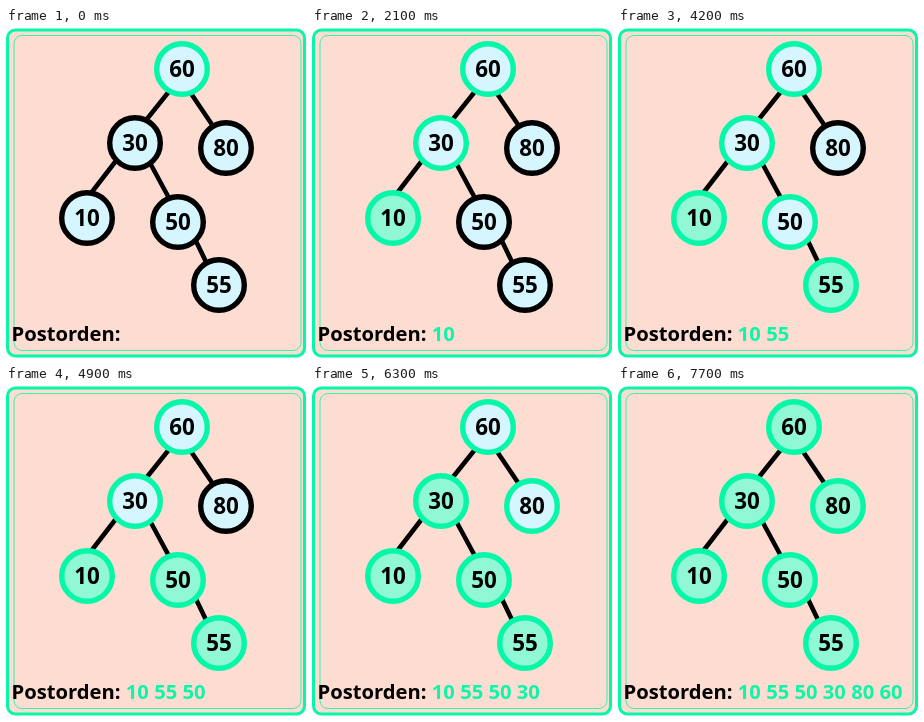
Recreate the animation shown at these times as an HTML page. Size 300x330 px, loop 8400 ms.

```html
<!DOCTYPE html>
<html lang="es">
<head>
<meta charset="utf-8">
<style>
html, body { margin: 0; width: 100%; height: 100%; overflow: hidden; background: #fff; }
svg { display: block; }
text { font-family: "Noto Sans", "Open Sans", sans-serif; font-weight: bold; }
.frame { fill: #fdddd1; stroke: #06f7a8; stroke-width: 3; }
.inner { fill: none; stroke: #06f7a8; stroke-width: .8; }
.edges { stroke: #000; stroke-width: 4.6; }
.node circle { fill: #d5f6ff; stroke: #000; stroke-width: 5.4; }
.node text { font-size: 22.4px; text-anchor: middle; }
.seen circle { stroke: #06f7a8; }
.done circle { fill: #90f8d5; }
.label { font-size: 20.2px; }
#out { fill: #0ef5a8; }
</style>
</head>
<body>
<svg id="stage" width="300" height="330" viewBox="0 0 300 330">
  <rect class="frame" x="1.5" y="2" width="297" height="326" rx="8"/>
  <rect class="inner" x="8" y="7.5" width="287" height="315" rx="8"/>
  <path class="edges" d="M163 63.5L139 93.5M184 64L209 101M111 131.5L84 166.5M143.5 134L163.5 171M188.5 210L201.5 237"/>
  <text class="label" x="5.6" y="313.2">Postorden: <tspan id="out"></tspan></text>
</svg>
<script>
const STEP = 700;
const tree = { 60: [176, 41], 30: [129, 115], 80: [220, 120], 10: [81, 190], 50: [172, 194], 55: [213, 257] };
// Each value appears twice: first when visited, then when written out.
const walk = [60, 30, 10, 10, 50, 55, 55, 50, 30, 80, 80, 60];
const stage = document.getElementById("stage");
const out = document.getElementById("out");
const nodes = {};

function add(parent, tag, attrs) {
  const el = document.createElementNS("http://www.w3.org/2000/svg", tag);
  for (const key in attrs) el.setAttribute(key, attrs[key]);
  return parent.appendChild(el);
}

for (const value in tree) {
  const [x, y] = tree[value];
  const g = nodes[value] = add(stage, "g", { class: "node" });
  add(g, "circle", { cx: x, cy: y, r: 25.3 });
  add(g, "text", { x, y: y + 8 }).textContent = value;
}

let shown = -1;
function draw(now) {
  const step = Math.floor(now / STEP) % walk.length;
  if (step !== shown) {
    shown = step;
    const past = walk.slice(0, step + 1);
    const done = past.filter((v, i) => past.indexOf(v) < i);
    for (const value in nodes) {
      nodes[value].classList.toggle("seen", past.includes(+value));
      nodes[value].classList.toggle("done", done.includes(+value));
    }
    out.textContent = done.join(" ");
  }
  requestAnimationFrame(draw);
}
draw(0);
</script>
</body>
</html>
```
